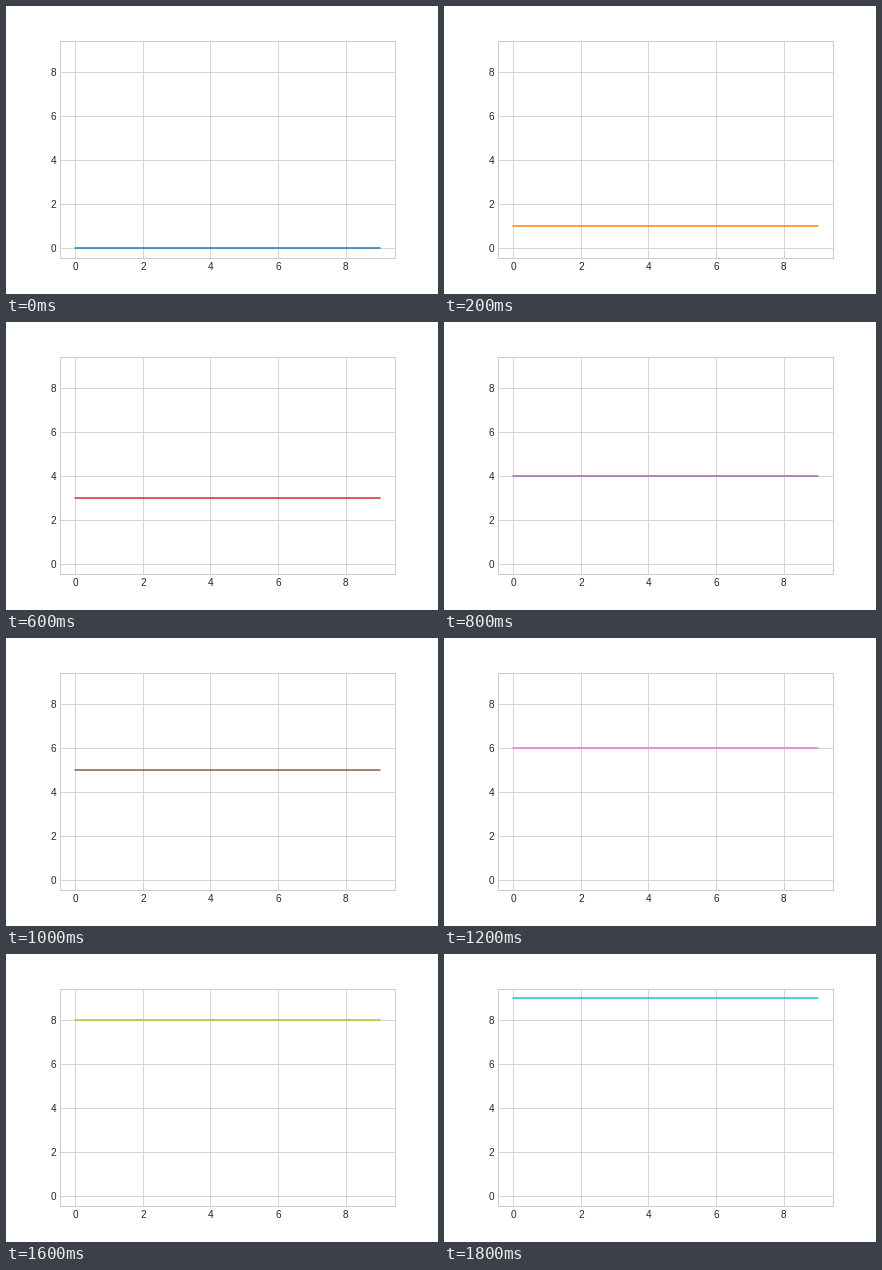
A matplotlib script for the animation above (2000 ms loop, 432 by 288 pixels).

```python
import matplotlib.pyplot as plt
from matplotlib.animation import FuncAnimation

LEVELS = 10
INTERVAL = 200
GREY, INK = ".8", ".15"

plt.rcParams.update({
    "figure.subplot.bottom": 0.125,
    "font.family": "Liberation Sans",
    "font.size": 10,
    "axes.axisbelow": True,
    "axes.edgecolor": GREY,
    "axes.linewidth": 1,
    "axes.grid": True,
    "grid.color": GREY,
    "grid.linestyle": "-",
    "grid.linewidth": 0.8,
    "lines.solid_capstyle": "round",
    "xtick.color": INK,
    "ytick.color": INK,
    "xtick.major.size": 0,
    "ytick.major.size": 0,
})

fig, ax = plt.subplots(figsize=(6, 4), dpi=72)
margin = 0.05 * (LEVELS - 1)
limits = (-margin, LEVELS - 1 + margin)
ax.set(xlim=limits, ylim=limits,
       xticks=range(0, LEVELS, 2), yticks=range(0, LEVELS, 2))

xs = list(range(LEVELS))
line, = ax.plot(xs, [0] * LEVELS, linewidth=1.5)


def update(level):
    """Raise the flat line one unit per step, taking the next cycle colour."""
    line.set_ydata([level] * LEVELS)
    line.set_color(f"C{level}")
    return line,


anim = FuncAnimation(fig, update, frames=LEVELS, interval=INTERVAL,
                     repeat=True, repeat_delay=0)
plt.show()
```
